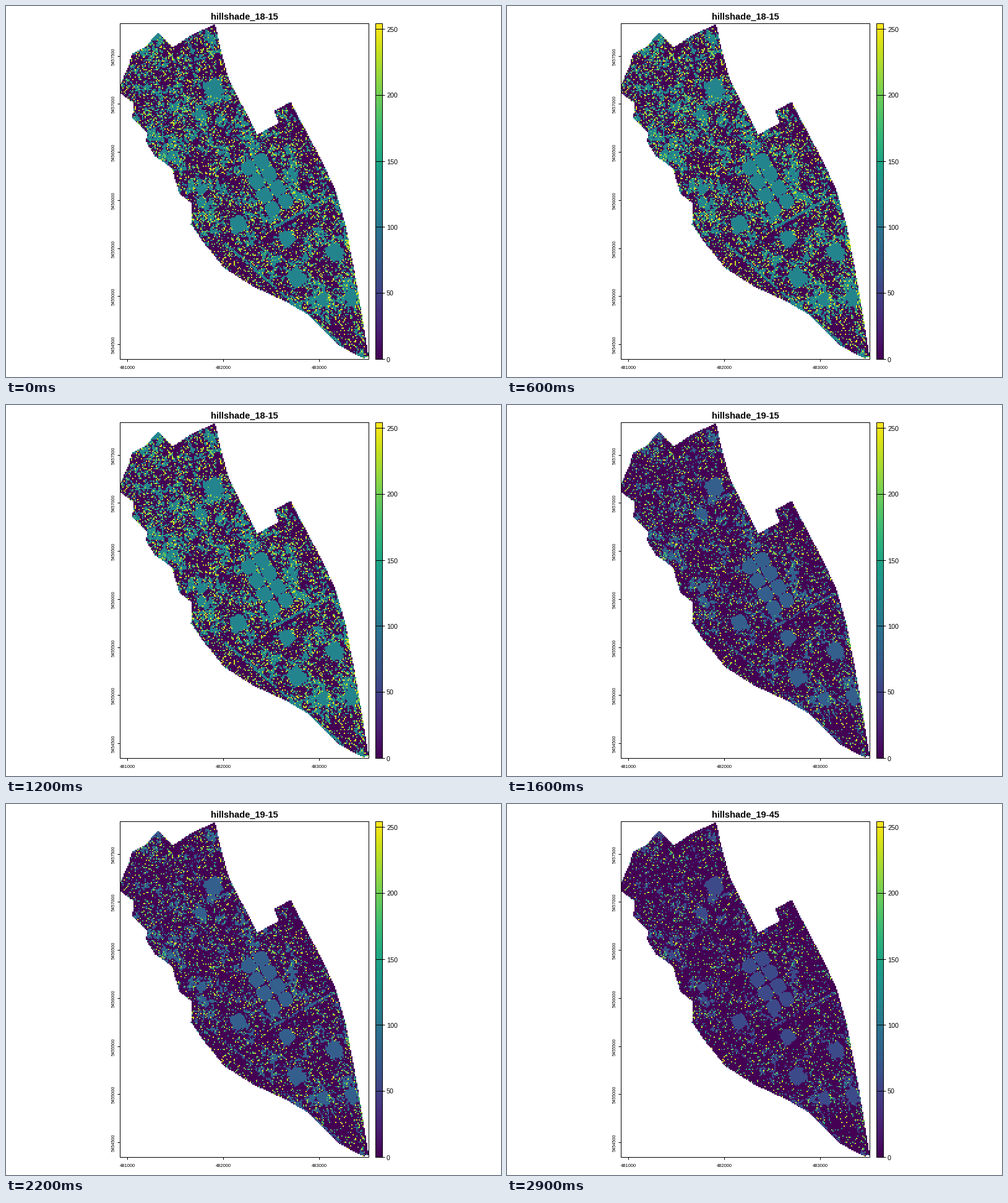
A matplotlib script for the animation above (3000 ms loop, 800x600 px).

```python
import numpy as np
import matplotlib.pyplot as plt
from matplotlib.animation import FuncAnimation
from matplotlib.path import Path
from matplotlib.patches import Rectangle

W, H, CELL = 800, 600, 2
LEFT, TOP, COLS, ROWS = 184, 28, 201, 272
PX = 0.72  # points per pixel at 100 dpi
FONT = "Liberation Sans"
CMAP = plt.get_cmap("viridis")
STEPS = [0, 1, 2, 3, 4, 6]  # quarter hours after 18:15

EAST = [(338, 29), (348, 75), (360, 118), (406, 208), (441, 189), (433, 170),
        (460, 155), (507, 244), (532, 296), (549, 355), (568, 455), (586, 567)]
WEST = [(577, 570), (538, 549), (488, 499), (452, 478), (400, 454),
        (353, 424), (318, 381), (299, 353), (301, 320), (280, 303),
        (268, 262), (241, 243), (226, 219), (229, 205), (204, 182),
        (207, 158), (185, 141), (185, 126), (197, 100), (204, 77),
        (223, 68), (246, 43), (270, 67), (296, 49)]

# Lone fields (x, y, radius) and wooded areas (x, y)
FIELDS = [(375, 351, 13), (454, 376, 13), (316, 297, 8), (317, 177, 8),
          (335, 132, 15), (470, 441, 14), (512, 475, 10), (532, 398, 14),
          (560, 472, 12)]
WOODS = [(220, 125), (480, 235), (405, 392), (545, 530)]

rng = np.random.RandomState(18)
gx, gy = np.meshgrid(LEFT + CELL * (np.arange(COLS) + .5),
                     TOP + CELL * (np.arange(ROWS) + .5))


def smooth_noise(sigma):
    """Unit-variance noise, blurred by sigma cells."""
    fy = np.fft.fftfreq(ROWS)[:, None]
    fx = np.fft.fftfreq(COLS)[None, :]
    kernel = np.exp(-2 * (np.pi * sigma) ** 2 * (fx ** 2 + fy ** 2))
    out = np.fft.ifft2(np.fft.fft2(rng.randn(ROWS, COLS)) * kernel).real
    return out / out.std()


def near_line(x0, y0, x1, y1, width):
    dx, dy = x1 - x0, y1 - y0
    t = np.clip(((gx - x0) * dx + (gy - y0) * dy) / (dx * dx + dy * dy), 0, 1)
    return np.hypot(gx - x0 - t * dx, gy - y0 - t * dy) < width


def rounded(u, v, fade):
    """Rounded square of half width 1, fading out at its rim."""
    r = (np.abs(u) ** 3 + np.abs(v) ** 3) ** (1 / 3)
    return np.clip((1.1 - r) / fade, 0, 1)


def grid_coords(x, y):
    """Position on the tilted street grid, in blocks."""
    basis = np.linalg.inv([[21, 13], [-12, 22]])
    return (basis[0, 0] * (gx - x) + basis[0, 1] * (gy - y),
            basis[1, 0] * (gx - x) + basis[1, 1] * (gy - y))


inside = Path(EAST + WEST).contains_points(
    np.column_stack([gx.ravel(), gy.ravel()])).reshape(gx.shape)

# The central block of fields fills two by four cells of the street grid
gi, gj = grid_coords(405, 284)
di, dj = gi - np.round(gi), gj - np.round(gj)
block = (np.abs(gi - .5) < 1) & (np.abs(gj - .5) < 2)
cover = block * rounded(di / .46, dj / .46, .25)
for x, y, radius in FIELDS:
    u, v = grid_coords(x, y)
    cover = np.maximum(cover, .75 * rounded(u * 24 / radius,
                                            v * 24 / radius, .4))
for road in [(430, 360, 530, 305), (355, 385, 545, 550)]:
    cover = np.maximum(cover, .5 * near_line(*road, 2.2))

openness = .75 * smooth_noise(3) + .8 * smooth_noise(.55)
openness -= .6 * (np.abs(di) > .44)
for x, y in WOODS:
    openness -= .9 * np.exp(-((gx - x) ** 2 + (gy - y) ** 2) / 36 ** 2)
openness -= near_line(325, 385, 440, 468, 14)
openness = openness * (1 - cover) + 3 * cover

slope = rng.uniform(.4, 1.3, gx.shape)
aspect = rng.normal(0, .75, gx.shape)
chance = .17 * np.clip(1 - 1.3 * cover, 0, 1)
for edge in [(547, 345, 578, 520), (520, 455, 522, 486)]:
    chance = np.where(near_line(*edge, 3), .5, chance)
steep = rng.rand(*gx.shape) < chance
endurance = rng.rand(*gx.shape)
bumpy = (rng.rand(*gx.shape) < .3) & (cover < .5)
ripple = bumpy * rng.normal(0, 14, gx.shape)


def hillshade(step):
    """Coloured raster for a sun that sinks with every quarter hour."""
    sin_alt = .45 - .0375 * step
    cos_alt = np.sqrt(1 - sin_alt ** 2)
    flat = np.where(openness > .3 + .12 * step, 255 * sin_alt + ripple, 0)
    facing = 255 * (sin_alt * np.cos(slope)
                    + cos_alt * np.sin(slope) * np.cos(aspect + .047 * step))
    value = np.where(steep & (endurance > .07 * step), facing, flat)
    rgba = CMAP(np.clip(value / 254, 0, 1))
    rgba[..., 3] = inside
    return rgba


def clock_name(step):
    hour, quarter = divmod(step + 1, 4)
    return f"hillshade_{18 + hour}-{15 * quarter:02d}"


rasters = [hillshade(step) for step in STEPS]
names = [clock_name(step) for step in STEPS]

fig = plt.figure(figsize=(W / 100, H / 100), dpi=100, facecolor="white")
ax = fig.add_axes([0, 0, 1, 1])
ax.axis("off")


def line(xs, ys):
    ax.plot(xs, ys, color="black", lw=PX, solid_capstyle="butt",
            snap=False, zorder=4)


def label(x, y, text, px, **kw):
    return ax.text(x, y, text, fontsize=px * PX, family=FONT,
                   color="black", **kw)


def box(x0, y0, x1, y1):
    ax.add_patch(Rectangle((x0, y0), x1 - x0, y1 - y0, fill=False,
                           ec="black", lw=PX, snap=False, zorder=5))


raster = ax.imshow(rasters[0], interpolation="nearest", aspect="auto",
                   extent=(LEFT, LEFT + CELL * COLS, TOP + CELL * ROWS, TOP))
ax.imshow(np.linspace(1, 0, 543)[:, None], cmap=CMAP, aspect="auto",
          interpolation="nearest", extent=(597, 609, 571.5, 28.5))
box(184.5, 28.5, 586.5, 571.5)
box(597.5, 28.5, 608.5, 571.5)

for i in range(3):
    x = 196.5 + 155 * i
    line([x, x], [571.5, 575.5])
    label(x - .5, 587, str(481000 + 1000 * i), 7.5, ha="center", va="baseline")
for i in range(7):
    y = np.floor(81 + 77.75 * i) + .5
    line([180.5, 184.5], [y, y])
    label(178, y, str(5457500 - 500 * i), 7.4, rotation=90,
          ha="right", va="center")
for v in range(0, 251, 50):
    y = np.floor(571.5 - 2.136 * v) + .5
    line([597.5, 612.5], [y, y])
    label(615, y + 4, str(v), 10.8, ha="left", va="baseline")

title = label(385, 22, names[0], 14.6, weight="bold",
              ha="center", va="baseline")
ax.set_xlim(0, W)
ax.set_ylim(H, 0)


def update(frame):
    i = frame % len(STEPS)
    raster.set_data(rasters[i])
    title.set_text(names[i])
    return raster, title


anim = FuncAnimation(fig, update, frames=30, interval=100,
                     repeat=True, repeat_delay=0)
plt.show()
```
